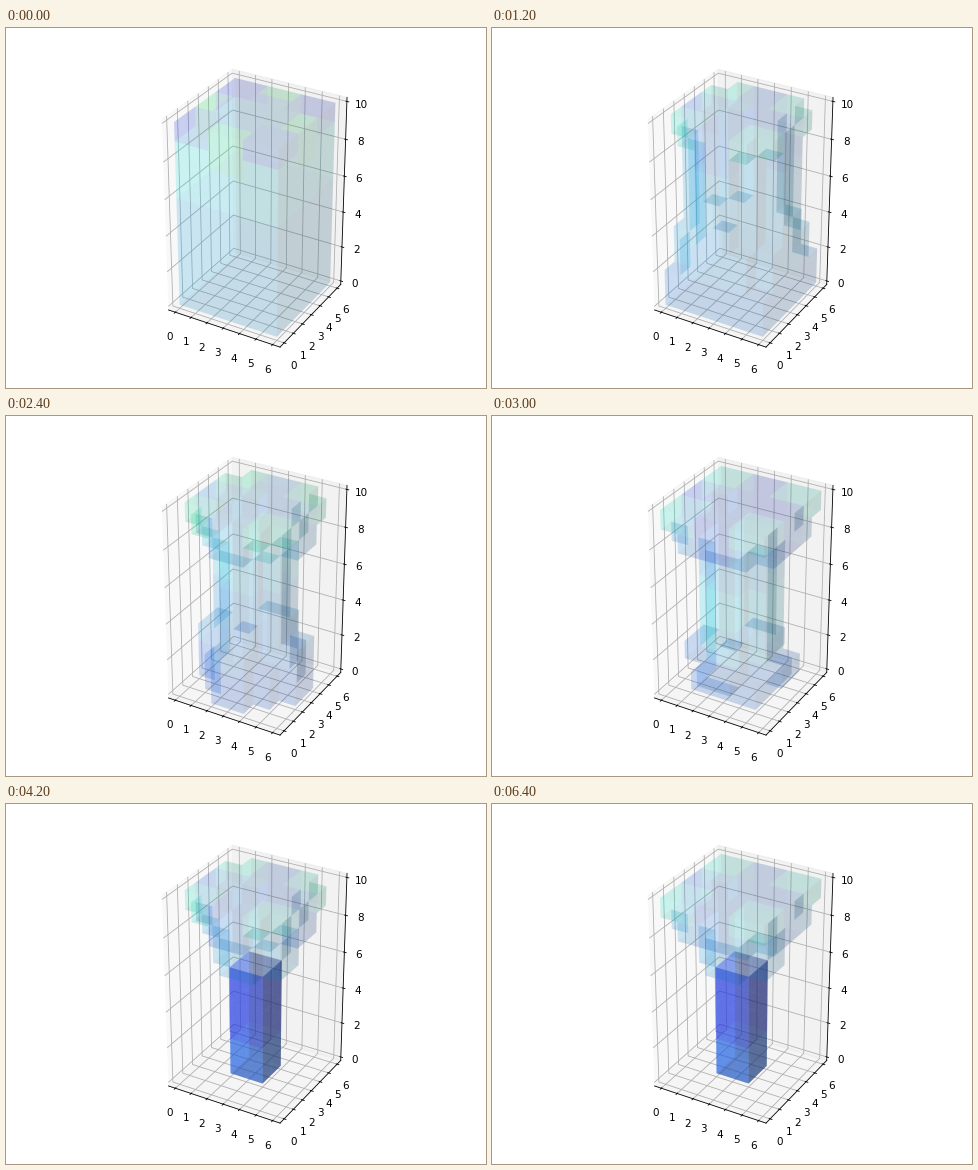
A matplotlib script for the animation above (6600 ms loop, 480 by 360 pixels).

```python
import matplotlib.pyplot as plt
import numpy as np
from matplotlib.animation import FuncAnimation
from matplotlib.colors import hsv_to_rgb

SHAPE = (6, 6, 10)
FRAMES, INTERVAL = 33, 200
THIN, DENSE = .11, .42

# The key moments shared by every track below
TIMES = [0, 6, 9, 15, 19, 25]

# Form: widths are ring numbers from 0 (core) to 5 (corners)
FOOT_WIDTH = [5.2, 5.2, 3.45, 2.45, 0, 0]
FOOT_HEIGHT = [4, 4, 3, 2, 0, 0]
SHAFT_WIDTH = [5, 3, 1, 1, 0, 0]
CROWN_WIDTH = [5, 4, 3, 5, 3, 5]

# Colour: hue of each part
FOOT_HUE = [.55, .59, .62, .60, .61, .61]
SHAFT_HUE = [.55, .55, .62, .52, .645, .645]
ARM_HUE = [.40, .61, .51, .64, .61, .61]
DIAGONAL_HUE = [.64, .47, .39, .48, .46, .48]

# Distance of each cell from the middle, 0 to 2 along either side
i, j, Z = np.indices(SHAPE)
dx, dy = np.abs(i - 2.5).astype(int), np.abs(j - 2.5).astype(int)
far, near = np.maximum(dx, dy), np.minimum(dx, dy)
DIAGONAL = near > 0
HEART = (far < 2) & ~DIAGONAL

# The floor layer grows as a square, all others as a cross
SQUARE = far * (far + 1) // 2 + near
CROSS = np.where((SQUARE == 2) | (SQUARE == 3), 5 - SQUARE, SQUARE)
RING = np.where(Z == 0, SQUARE, CROSS)


def at(track, n):
    return np.interp(n, TIMES, track)


def solid(n):
    shaft = np.ceil(at(SHAFT_WIDTH, n))
    foot = np.floor(at(FOOT_WIDTH, n) - .45 * Z + .5)
    crown = np.floor(at(CROWN_WIDTH, n) + .5) - (Z == 8)
    width = np.select([Z < at(FOOT_HEIGHT, n), Z < 6, Z < 8],
                      [foot, shaft, 1], crown)
    return RING <= np.maximum(width, shaft)


def tint(n):
    foot, shaft = at(FOOT_HUE, n), at(SHAFT_HUE, n)
    arm, diagonal = at(ARM_HUE, n), at(DIAGONAL_HUE, n)
    neck = .6 * arm + .4 * diagonal
    hue = np.select(
        [Z < 2, Z < 6, (Z < 8) | (DIAGONAL & (Z == 8)), DIAGONAL, HEART],
        [foot, shaft, neck, diagonal, max(arm, .6)], arm)
    stem = np.interp(n, [15, 19], [THIN, DENSE])
    alpha = np.where(Z < 6, stem, THIN)
    rgb = hsv_to_rgb(np.stack([hue, np.full(SHAPE, .9), np.ones(SHAPE)], -1))
    return np.concatenate([rgb, alpha[..., None]], -1)


fig = plt.figure(figsize=(6.4, 4.8), dpi=75)
ax = fig.add_subplot(projection='3d')
ax.set_box_aspect(SHAPE)
faces = []


def draw(n):
    while faces:
        faces.pop().remove()
    faces.extend(ax.voxels(solid(n), facecolors=tint(n)).values())
    return faces


anim = FuncAnimation(fig, draw, frames=FRAMES, interval=INTERVAL,
                     init_func=lambda: draw(0), repeat=True, repeat_delay=0)
plt.show()
```
